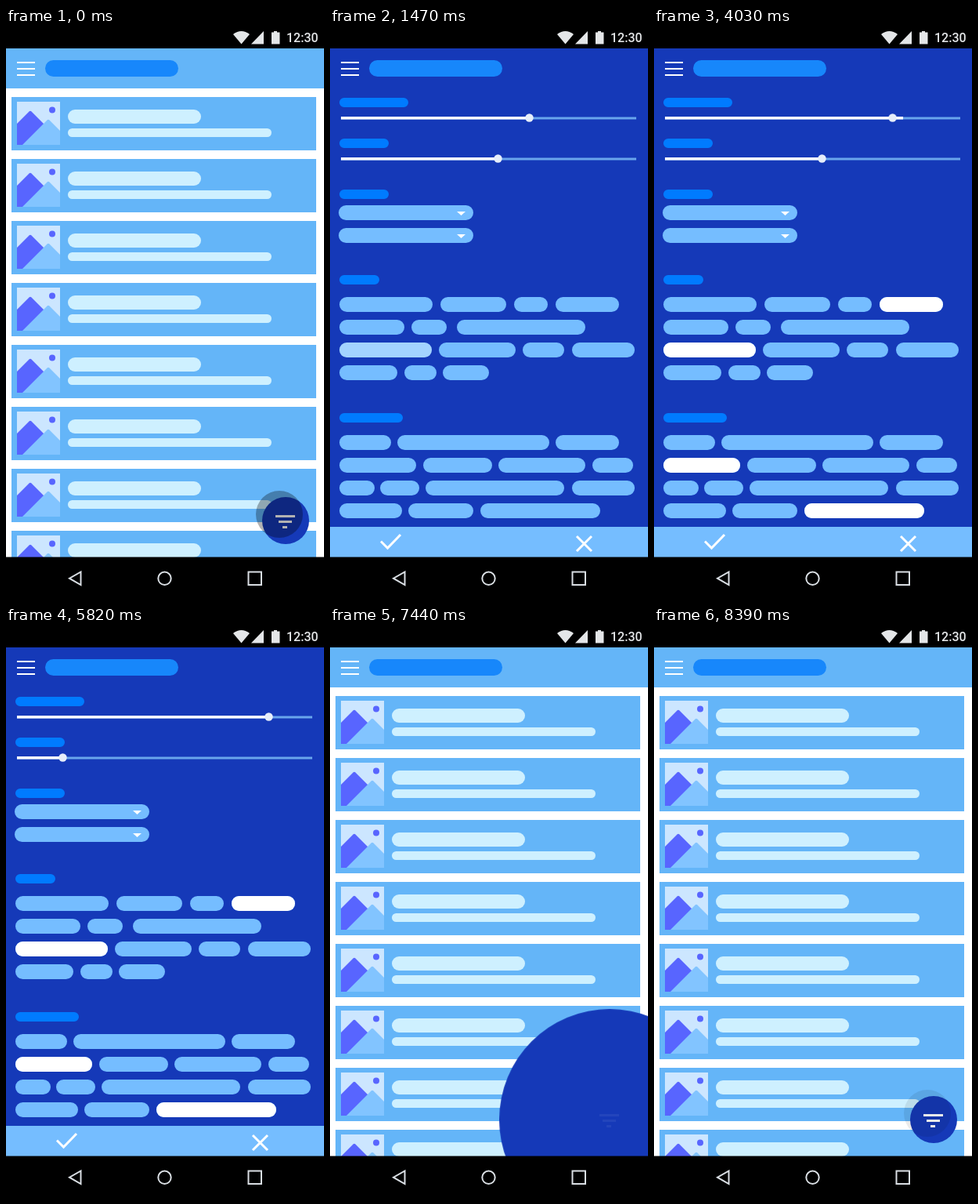
Write an HTML page without scripts that moves like this. It is 406x728 px and loops after 8450 ms.

```html
<!DOCTYPE html>
<html lang="en">
<head>
<meta charset="utf-8">
<title>Filter panel</title>
<style>
html, body { margin: 0; width: 100%; height: 100%; overflow: hidden; background: #fff; }
svg { display: block; width: 406px; height: 728px; }
text { font: 500 16px Roboto, sans-serif; fill: #e4e6e8; }

.line { fill: none; stroke: #fff; }
.label, .chips, .lit { fill: none; stroke-linecap: round; }
.label { stroke: #007bff; stroke-width: 12; }
.chips, .lit { stroke: #75bdff; stroke-width: 19; }
.lit { stroke: #fff; }
.nav { fill: none; stroke: #d9dee3; stroke-width: 2; }

/* One shared clock: every part runs on the same loop. */
.fab, .icon, .late, .early, .tap, .confirm, .lit, .fill, .knob, .filtered {
  animation: 8.45s linear infinite;
}
.fab, .fill { transform-box: fill-box; }
.fab { fill: #1539b8; transform-origin: center; animation-name: reveal; }
.icon { animation-name: icon; }
.late { animation-name: late; }
.early { animation-name: early; }
.tap { animation-name: tap; }
.confirm { animation-name: confirm; }
.filtered { animation-name: filtered; }
.fill { fill: #fff; transform-origin: left; }
.knob { fill: #e6eefa; }
.pick1 { animation-name: pick1; }
.pick2 { animation-name: pick2; }
.pick3 { animation-name: pick3; }
.pick4 { animation-name: pick4; }
.fill.a { animation-name: fillA; }
.knob.a { animation-name: knobA; }
.fill.b { animation-name: fillB; }
.knob.b { animation-name: knobB; }

@keyframes reveal {
  0%, .95% { transform: scale(1); animation-timing-function: ease-in; }
  4.73%, 86.27% { transform: scale(23.6); animation-timing-function: ease-out; }
  88.99%, 100% { transform: scale(1); }
}
@keyframes icon {
  0%, .95% { opacity: 1; }
  2.4%, 88% { opacity: 0; }
  88.99%, 100% { opacity: 1; }
}
@keyframes late {
  0%, 5.56% { opacity: 0; }
  10.5%, 79.76% { opacity: 1; transform: none; }
  84.38%, 100% { opacity: 0; transform: translateX(1px); }
}
@keyframes early {
  0%, 6.4% { opacity: 0; }
  11.83%, 79.17% { opacity: 1; transform: none; }
  83.67%, 100% { opacity: 0; transform: translateX(3px); }
}
@keyframes tap {
  0%, .95% { opacity: .3; }
  3.5%, 99.05% { opacity: 0; }
  100% { opacity: .3; }
}
@keyframes confirm {
  0%, 76.09% { opacity: 0; }
  78.1%, 80% { opacity: .3; }
  85.2%, 100% { opacity: 0; }
}
@keyframes filtered {
  0%, 89.82% { opacity: 1; }
  93.61%, 94.44% { opacity: 0; }
  98.22%, 100% { opacity: 1; }
}
@keyframes pick1 { 0%, 16.45% { opacity: 0; } 19.29%, 100% { opacity: 1; } }
@keyframes pick2 { 0%, 25.44% { opacity: 0; } 28.28%, 100% { opacity: 1; } }
@keyframes pick3 { 0%, 32.9% { opacity: 0; } 35.62%, 100% { opacity: 1; } }
@keyframes pick4 { 0%, 41.3% { opacity: 0; } 42.25%, 100% { opacity: 1; } }
@keyframes fillA {
  0%, 46.75% { transform: scaleX(.748); animation-timing-function: cubic-bezier(.23, 1, .32, 1); }
  50.41%, 100% { transform: none; }
}
@keyframes knobA {
  0%, 46.75% { transform: translateX(-81px); animation-timing-function: cubic-bezier(.215, .61, .355, 1); }
  50.41%, 100% { transform: none; }
}
@keyframes fillB {
  0%, 54.91% { transform: none; animation-timing-function: cubic-bezier(.23, 1, .32, 1); }
  58.7%, 100% { transform: scaleX(.29); }
}
@keyframes knobB {
  0%, 54.91% { transform: none; animation-timing-function: cubic-bezier(.215, .61, .355, 1); }
  58.7%, 100% { transform: translateX(-142px); }
}
</style>
</head>
<body>
<svg viewBox="0 0 406 728" xmlns="http://www.w3.org/2000/svg">
  <defs>
    <g id="card">
      <path fill="#64b5f8" d="M7 88h389v68H7z"/>
      <path fill="#cce6ff" d="M14 94h55v55H14z"/>
      <path fill="#5865ff" d="M14 122L29.500 106.500Q31 105.200 32.500 106.500L50 124L30 149H14z"/>
      <path fill="#82c4ff" d="M21 149L52.500 117.500Q54 116 55.500 117.500L69 131V149z"/>
      <circle cx="59" cy="104.500" r="4" fill="#5865ff"/>
      <g fill="#cef0ff">
        <rect x="79" y="104" width="170" height="18" rx="9"/>
        <rect x="79" y="128" width="260" height="11" rx="5.500"/>
      </g>
    </g>
  </defs>

  <path fill="#fff" d="M0 0h406v728H0z"/>
  <path fill="#64b5f8" d="M0 26h406v51H0z"/>

  <use href="#card" class="filtered"/>
  <use href="#card" y="79"/>
  <use href="#card" y="158"/>
  <use href="#card" y="237" class="filtered"/>
  <use href="#card" y="316" class="filtered"/>
  <use href="#card" y="395"/>
  <use href="#card" y="474"/>
  <use href="#card" y="553"/>

  <circle class="fab" cx="357" cy="628" r="30"/>
  <path class="line icon" stroke-width="3" d="M344 622.500h25M348 629.500h17M353 636.500h6"/>
  <circle class="tap" cx="349" cy="620" r="30"/>

  <!-- Filter panel -->
  <g class="late">
    <path class="label" d="M18 95h76M18 147h51M18 212h51"/>
  </g>

  <g class="early">
    <path class="label" d="M18 321h39M18 497h69"/>

    <path fill="#69a5ec" d="M14 113.500h377v3H14zM14 165.500h377v3H14z"/>
    <rect class="fill a" x="14" y="113" width="321" height="3.500"/>
    <rect class="fill b" x="14" y="165" width="200" height="3.500"/>
    <circle class="knob a" cx="335.500" cy="114.500" r="5.200"/>
    <circle class="knob b" cx="214.500" cy="166.500" r="5.200"/>

    <path class="chips" d="M20.500 235.500H173.500M20.500 264.500H173.500"/>
    <path fill="#fff" d="M162 234h11l-5.500 5zM162 263h11l-5.500 5z"/>

    <path class="chips" d="
      M21.500 352.500H121.500M150.500 352.500H215.500M244.500 352.500H268.500M297.500 352.500H359.500
      M21.500 381.500H85.500M113.500 381.500H139.500M171.500 381.500H316.500
      M21.500 410.500H120.500M148.500 410.500H227.500M255.500 410.500H289.500M318.500 410.500H379.500
      M21.500 439.500H76.500M104.500 439.500H126.500M153.500 439.500H193.500
      M21.500 528.500H68.500M95.500 528.500H270.500M297.500 528.500H359.500
      M21.500 557.500H100.500M128.500 557.500H197.500M224.500 557.500H316.500M344.500 557.500H377.500
      M21.500 586.500H47.500M73.500 586.500H104.500M131.500 586.500H289.500M318.500 586.500H379.500
      M21.500 615.500H82.500M109.500 615.500H173.500M201.500 615.500H335.500"/>
    <path class="lit pick1" d="M21.500 410.500H120.500"/>
    <path class="lit pick2" d="M297.500 352.500H359.500"/>
    <path class="lit pick3" d="M21.500 557.500H100.500"/>
    <path class="lit pick4" d="M201.500 615.500H335.500"/>
  </g>

  <g class="late">
    <path fill="#75bdff" d="M-2 636h410v39H-2z"/>
    <path class="line" stroke-width="3" d="M65 654.500l8.500 8.500L90 646M315 648l19 19M334 648l-19 19"/>
  </g>
  <circle class="confirm" cx="77" cy="653" r="17"/>

  <!-- Toolbar -->
  <path class="line" stroke-width="2" d="M14 44h23M14 52h23M14 60h23"/>
  <rect x="50" y="41" width="170" height="21" rx="10.500" fill="#1787fb"/>

  <!-- System bars -->
  <path d="M0 0h406v26H0zM0 674.500h406V728H0z"/>
  <g fill="#e4e6e8">
    <path d="M290 8Q300.500 0 311 8L300.500 20.500z"/>
    <path d="M313 20.500L329 4V20.500z"/>
    <path d="M339 5.500h3V4h4v1.500h3.500v15H339z"/>
  </g>
  <text x="358" y="18">12:30</text>
  <path class="nav" d="M95.500 693.500v16.500L81 701.700zM309.500 693.500h16.500v16.500h-16.500z"/>
  <circle class="nav" cx="202.500" cy="701.800" r="8.200"/>
</svg>
</body>
</html>
```
